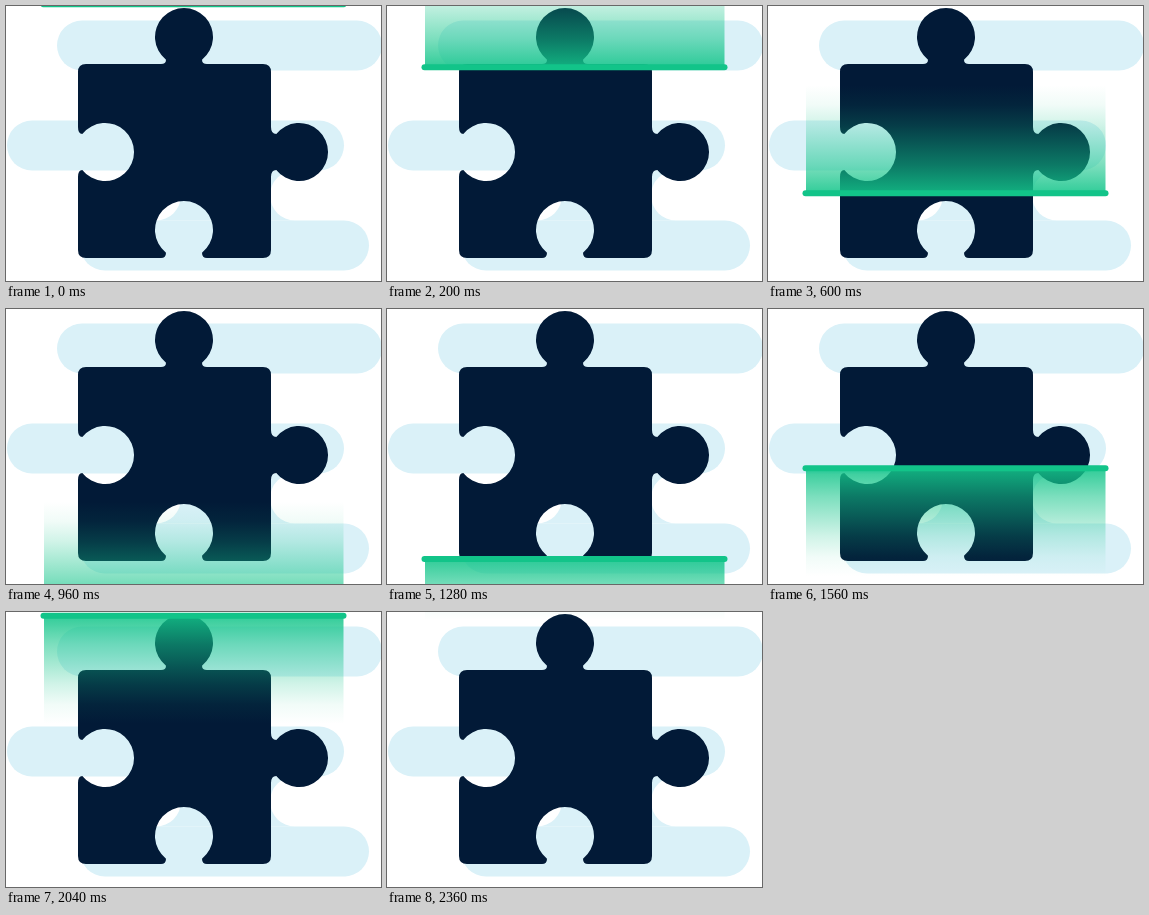
Recreate the animation shown at these times as an HTML page. Size 375 by 275 pixels, loop 2.4 s.

```html
<!DOCTYPE html>
<html lang="en">
<head>
<meta charset="utf-8">
<title>Puzzle scan</title>
<style>
  html, body { margin: 0; width: 100%; height: 100%; overflow: hidden; background: #fff; }
  svg { display: block; width: 100vw; height: 100vh; }
</style>
</head>
<body>
<svg viewBox="0 0 375 275">
  <defs>
    <linearGradient id="glow" x1="0" y1="1" x2="0" y2="0">
      <stop offset="0" stop-color="#14c58a" stop-opacity=".88"/>
      <stop offset=".26" stop-color="#14c58a" stop-opacity=".56"/>
      <stop offset=".63" stop-color="#14c58a" stop-opacity=".2"/>
      <stop offset=".82" stop-color="#14c58a" stop-opacity=".06"/>
      <stop offset="1" stop-color="#14c58a" stop-opacity="0"/>
    </linearGradient>
  </defs>
  <g fill="#daf1f8">
    <rect x="51" y="14.5" width="325" height="50" rx="25"/>
    <rect x="1" y="114.5" width="337" height="50" rx="25"/>
    <rect x="74" y="214.5" width="289" height="50" rx="25"/>
    <!-- bridge between the two lower bands -->
    <path d="M150 164.5A25 25 0 0 1 150 214.5H289A25 25 0 0 1 289 164.5Z"/>
  </g>
  <path fill="#021a37" d="M80 58H155Q160 58 160 53.7A29 29 0 1 1 196 53.7Q196 58 201 58
    H257Q265 58 265 66V121Q265 128 270.3 128A29 29 0 1 1 270.3 164Q265 164 265 171
    V244Q265 252 257 252H201Q196 252 196 246.7A29 29 0 1 0 160 246.7Q160 252 155 252
    H80Q72 252 72 244V171Q72 164 76.3 164A29 29 0 1 0 76.3 128Q72 128 72 121V66Q72 58 80 58Z"/>
  <g id="scan">
    <rect x="38" y="-108" width="299.5" height="108" fill="url(#glow)"/>
    <rect x="34.5" y="-3" width="306" height="6" rx="3" fill="#12c489"/>
  </g>
</svg>
<script>
  const LOOP = 2400, STEP = 40, TURN = 1180;
  const scan = document.getElementById('scan');

  function draw(ms) {
    const t = Math.floor((ms % LOOP) / STEP) * STEP;
    const down = t < TURN;
    const y = down ? -1.7 + 0.315 * t : 250 - 0.324 * (t - 1280);
    // the glow trails behind the bar
    scan.setAttribute('transform', `translate(0 ${y.toFixed(2)}) scale(1 ${down ? 1 : -1})`);
  }

  const start = performance.now();
  function tick() {
    draw(performance.now() - start);
    requestAnimationFrame(tick);
  }
  tick();
</script>
</body>
</html>
```
